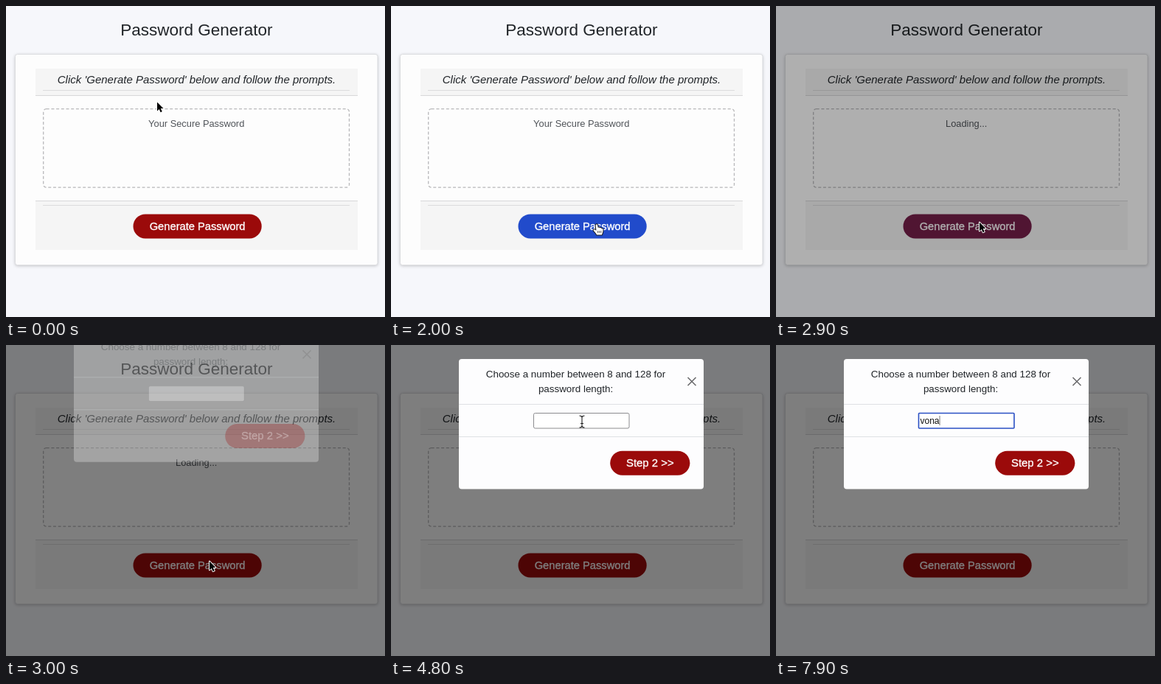
Write an HTML page with a canvas that moves like this. It is 514x422 px and loops after 8000 ms.

```html
<!DOCTYPE html>
<html lang="en">
<head>
<meta charset="utf-8">
<title>Password Generator</title>
<style>
  html, body { margin: 0; width: 100%; height: 100%; overflow: hidden; background: #f6f7fb; }
  canvas { display: block; width: 514px; height: 422px; }
</style>
</head>
<body>
<canvas id="stage"></canvas>
<script>
const W = 514, H = 422, LOOP = 8000, STEP = 100;
const canvas = document.getElementById('stage');
const ctx = canvas.getContext('2d');
const dpr = window.devicePixelRatio || 1;
canvas.width = W * dpr;
canvas.height = H * dpr;

const SANS = '"Liberation Sans", Arial, sans-serif';
const RED = [155, 10, 10], BLUE = [33, 75, 203];
const BUTTON = [172.5, 282.4, 174.2, 33];
const NEXT = [297.2, 143.7, 108.2, 33];
const AREA = [50, 139, 416, 108];
const INPUT = [193, 92, 130, 21];

const HOVER = 1500, CLICK = 2807, MODAL = 2957;
const FOCUS = 5100, LIST = 5200, TYPE = 6700, KEY_GAP = 300;
const WORD = 'vona';
const CHOICES = ['23', '34', '12', '10', '45', '3'];

// time, x, y
const PATH = [
  [0, 205, 130.5], [900, 238, 205], [1200, 238, 205], [1700, 284, 302],
  [2000, 279, 296.5], [2300, 279, 296.5], [2700, 276, 293.5],
  [3500, 276, 293.5], [4200, 259, 104]
];

const clamp = v => Math.max(0, Math.min(1, v));
const smooth = p => p * p * (3 - 2 * p);
const easeOut = p => 1 - (1 - p) ** 2;
const mix = (a, b, p) => a + (b - a) * p;
const span = (t, start, length) => clamp((t - start) / length);
const inside = (x, y, [bx, by, bw, bh]) => x >= bx && x <= bx + bw && y >= by && y <= by + bh;

function text(str, x, y, size, color, align = 'center', style = '', family = SANS) {
  ctx.font = `${style} ${size}px ${family}`;
  ctx.textAlign = align;
  ctx.fillStyle = color;
  ctx.fillText(str, x, y);
}

function rect(x, y, w, h, color) {
  ctx.fillStyle = color;
  ctx.fillRect(x, y, w, h);
}

function rounded(x, y, w, h, r) {
  ctx.beginPath();
  ctx.roundRect(x, y, w, h, r);
}

function pill([x, y, w, h], color, label, size) {
  rounded(x, y, w, h, h / 2);
  ctx.fillStyle = color;
  ctx.fill();
  const cx = x + w / 2, base = y + 21.2;
  text(label, cx, base, size, '#fff');
  ctx.strokeStyle = '#fff';
  ctx.lineWidth = .35;
  ctx.strokeText(label, cx, base);
}

function position(t) {
  let i = 0;
  while (i < PATH.length - 2 && t >= PATH[i + 1][0]) i++;
  const [t0, x0, y0] = PATH[i], [t1, x1, y1] = PATH[i + 1];
  const p = smooth(span(t, t0, t1 - t0));
  return [mix(x0, x1, p), mix(y0, y1, p)];
}

function drawPage(t) {
  rect(0, 0, W, H, '#f6f7fb');
  text('Password Generator', 258.3, 40, 22.5, '#212529');

  ctx.save();
  ctx.shadowColor = 'rgba(0,0,0,.24)';
  ctx.shadowBlur = 4 * dpr;
  ctx.shadowOffsetY = dpr;
  rounded(12.5, 65.5, 491.5, 286, 3);
  ctx.fillStyle = '#fdfdfd';
  ctx.fill();
  ctx.restore();
  ctx.strokeStyle = '#dcdde0';
  ctx.lineWidth = 1;
  ctx.stroke();

  rect(40, 85, 437, 36, '#f5f5f5');
  rect(40, 121, 437, 1, '#d8d8d9');
  rect(50, 114, 416, 1, '#dcdcdd');
  text("Click 'Generate Password' below and follow the prompts.", 258.5, 104.5, 15, '#212529', 'center', 'italic');

  ctx.setLineDash([4, 2.7]);
  ctx.strokeStyle = '#b8b8ba';
  ctx.lineWidth = 1.3;
  rounded(50.7, 139.6, 414.8, 106.6, 4);
  ctx.stroke();
  ctx.setLineDash([]);
  text(t < CLICK ? 'Your Secure Password' : 'Loading...', 258.2, 164, 12.85, '#505459');

  rect(40, 265, 437, 66, '#f5f5f5');
  rect(40, 264, 437, 1, '#d8d8d9');
  rect(50, 270, 416, 1, '#dcdcdd');
  const hover = smooth(span(t, HOVER, 150)) - smooth(span(t, CLICK, 150));
  const color = RED.map((c, i) => Math.round(mix(c, BLUE[i], hover)));
  pill(BUTTON, `rgb(${color})`, 'Generate Password', 14.7);
}

function drawInput(t) {
  const [x, y, w, h] = INPUT;
  const focused = t >= FOCUS;
  rounded(x + .5, y + .5, w - .5, h - .5, focused ? 1 : 2);
  ctx.fillStyle = '#fff';
  ctx.fill();
  ctx.strokeStyle = focused ? '#2b50c4' : '#8c8c8f';
  ctx.lineWidth = focused ? 1.6 : 1;
  ctx.stroke();
  if (!focused) return;

  const count = t < TYPE ? 0 : Math.min(WORD.length, 1 + Math.floor((t - TYPE) / KEY_GAP));
  const typed = WORD.slice(0, count);
  text(typed, 195.5, 106.5, 12, '#111', 'left');
  const blinkOn = t < 5800 || t >= 6300;
  if (blinkOn) rect(195.5 + ctx.measureText(typed).width, 96, 1, 13, '#777');
}

function drawModal(t) {
  const p = span(t, MODAL, 300);
  ctx.save();
  ctx.globalAlpha = span(t, MODAL, 150);
  ctx.translate(0, -50 * (1 - easeOut(p)));
  rounded(92, 19, 332, 176.5, 4);
  ctx.fillStyle = '#fdfdfe';
  ctx.fill();
  text('Choose a number between 8 and 128 for', 250.5, 43.5, 13.4, '#212529');
  text('password length:', 250.5, 63.5, 13.4, '#212529');

  ctx.strokeStyle = '#6c6c6e';
  ctx.lineWidth = 1.6;
  ctx.beginPath();
  ctx.moveTo(402.5, 44); ctx.lineTo(413.5, 55);
  ctx.moveTo(413.5, 44); ctx.lineTo(402.5, 55);
  ctx.stroke();

  rect(92, 80, 332, 1, '#dfe1e4');
  rect(92, 124, 332, 1, '#dfe1e4');
  drawInput(t);
  pill(NEXT, `rgb(${RED})`, 'Step 2 >>', 14.9);
  ctx.restore();
}

function drawList() {
  ctx.fillStyle = '#232225';
  rounded(244.5, 120, 39.5, 149, 3);
  ctx.fill();
  ctx.beginPath();
  ctx.moveTo(251, 120.5);
  ctx.lineTo(258, 114);
  ctx.lineTo(265, 120.5);
  ctx.fill();
  CHOICES.forEach((n, i) =>
    text(n, 252, 137.5 + 24 * i, 8.8, '#f4f4f4', 'left', '600', 'Inter, Roboto, sans-serif'));
}

function outline(path, fill, stroke, width) {
  ctx.lineJoin = 'round';
  ctx.strokeStyle = stroke;
  ctx.lineWidth = width;
  ctx.fillStyle = fill;
  ctx.stroke(path);
  ctx.fill(path);
}

const ARROW = new Path2D('M0 0V13.5L3.1 10.7L5.3 15.6L7.6 14.6L5.5 9.8H9.6Z');
const HAND = new Path2D('M-1.4 .8C-1 -.6 .8 -.4 1.1 1L1.8 4.4C2.8 3.6 4 4 4.3 4.9C5.2 4.3 6.3 4.7 6.5 5.7' +
  'C7.6 5.3 8.5 6 8.5 7.2C8.6 10 7.8 11.5 7 14H0C-.8 12 -2.6 10.2 -4.2 8.5C-5 7.2 -3.6 6.2 -2.4 7.1L-.6 8.2Z');
const BEAM = new Path2D('M-3.5 -8Q-.5 -8 0 -6Q.5 -8 3.5 -8M0 -6V6M-3.5 8Q-.5 8 0 6Q.5 8 3.5 8M-2 2.5H2');

function drawCursor(t) {
  if (t >= TYPE) return;
  const [x, y] = position(t);
  const open = t >= CLICK;
  ctx.save();
  ctx.translate(x, y);
  if (inside(x, y, open ? INPUT : AREA)) {
    ctx.strokeStyle = '#222';
    ctx.lineWidth = 1.1;
    ctx.stroke(BEAM);
  } else if (!open && inside(x, y, BUTTON)) {
    outline(HAND, '#fff', '#161616', 2);
    ctx.strokeStyle = '#333';
    ctx.lineWidth = .8;
    ctx.beginPath();
    for (const fx of [1.6, 3.7, 5.8]) {
      ctx.moveTo(fx, 8.5);
      ctx.lineTo(fx, 11.5);
    }
    ctx.stroke();
  } else {
    ctx.scale(.88, .88);
    outline(ARROW, '#000', '#fff', 2.2);
  }
  ctx.restore();
}

function draw(t) {
  ctx.setTransform(dpr, 0, 0, dpr, 0, 0);
  drawPage(t);
  const shade = .5 * span(t, CLICK, 150);
  if (shade) rect(0, 0, W, H, `rgba(0,0,0,${shade})`);
  if (t > MODAL) drawModal(t);
  if (t >= LIST && t < TYPE) drawList();
  drawCursor(t);
}

const start = performance.now();
function tick() {
  const t = (performance.now() - start) % LOOP;
  draw(Math.floor(t / STEP) * STEP);
  requestAnimationFrame(tick);
}
tick();
</script>
</body>
</html>
```
